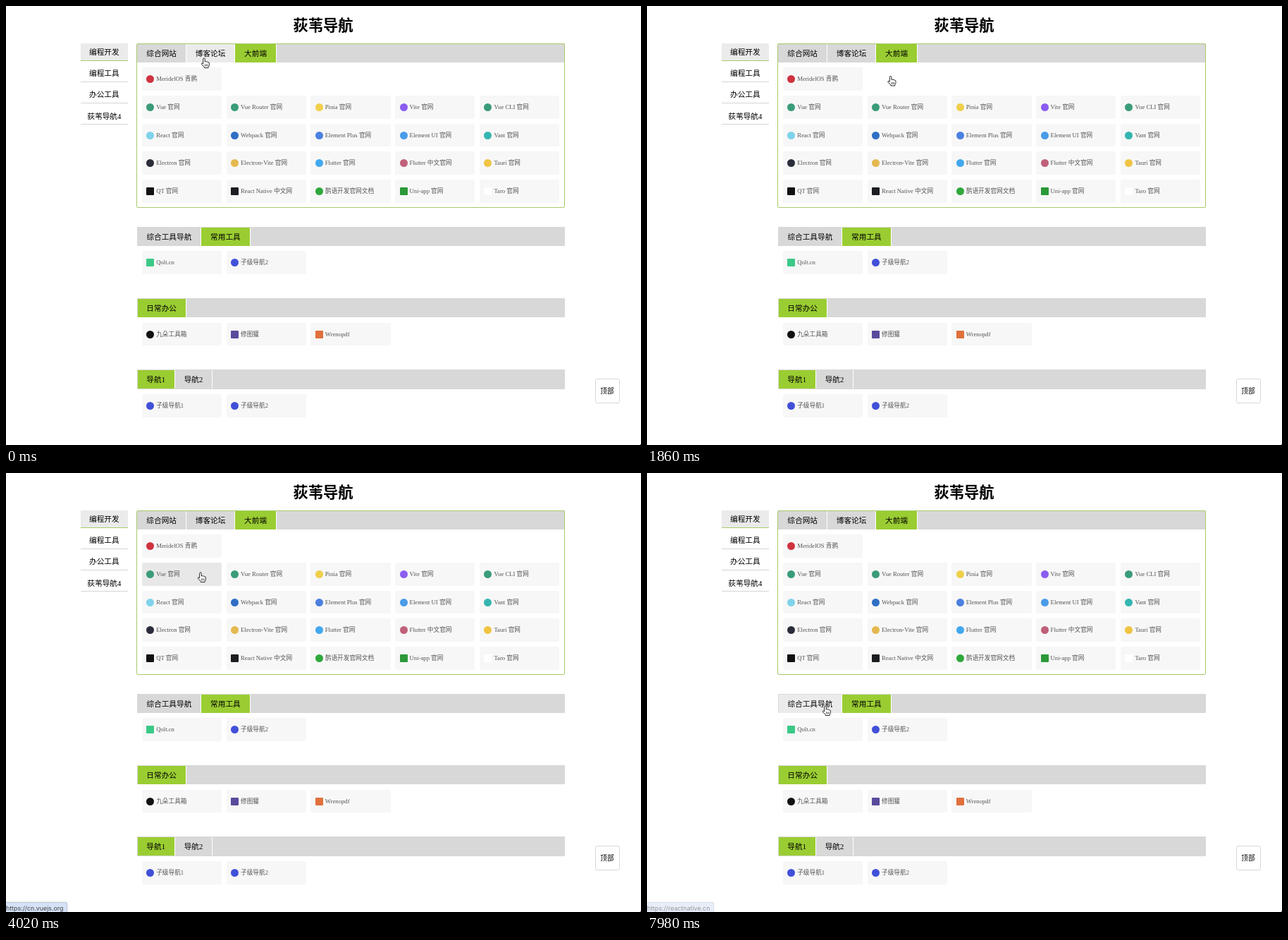
An HTML page that plays this animation: 901x622 px, repeating every 8000 ms.

```html
<!DOCTYPE html>
<html lang="zh-CN">
<head>
<meta charset="utf-8">
<title>荻苇导航</title>
<style>
html, body { margin: 0; width: 100%; height: 100%; overflow: hidden; background: #fff; }
#stage { position: relative; width: 901px; height: 622px; overflow: hidden; color: #000;
  font: 500 10.67px "Liberation Serif", "Noto Sans CJK SC", "Noto Sans CJK", serif; }
#stage div, #stage svg { position: absolute; white-space: pre; box-sizing: border-box; }
.mid { text-align: center; }
.bar { background: #d8d8d8; }
.tab { border-right: 1px solid #fff; text-align: center; }
.tab.hover { background: #ebebeb; }
.tab.on { background: #9acd32; }
.tile { background: #f7f7f7; border-radius: 2px; color: #555; font-weight: normal; font-size: 8.67px; padding-left: 20.5px; }
.tile.hover { background: #e8e8e8; }
.icon { width: 11px; height: 11px; left: 6.5px; top: 11px; }
.panel { border: 1px solid #a9c96a; border-radius: 2px; }
#tip, #status { font-family: Inter, "Noto Sans CJK SC", "Noto Sans CJK", sans-serif; font-weight: normal; }
#tip { height: 37px; padding: 0 5px; background: #d4d4d4; color: #222; font-size: 8.3px; line-height: 20.5px;
  border-radius: 1px; box-shadow: 0 1px 5px rgba(0,0,0,.3); }
#tip span { position: relative; top: -2.3px; }
#status { left: 0; top: 608px; height: 15px; padding-right: 5px; background: #d5e2f7; color: #444; font-size: 8.85px;
  line-height: 15px; border: solid #bcc8da; border-width: 1px 1px 0 0; border-radius: 0 3px 0 0;
  box-shadow: 0 0 4px rgba(0,0,0,.12); }
</style>
</head>
<body>
<div id="stage"></div>
<script>
const LOOP = 8000, TICK = 60, ROW = 39.67, COL = 119.8, SECTION = 101.3;
const stage = document.getElementById('stage');
const hits = [];

function box(parent, cls, x, y, w, h, text = '') {
  const el = document.createElement('div');
  el.className = cls;
  el.textContent = text;
  el.style.cssText = `left:${x}px;top:${y}px;width:${w}px;height:${h}px;line-height:${h}px`;
  return parent.appendChild(el);
}

function layer(view) {
  const el = box(stage, '', 0, 0, 901, 0);
  el.dataset.view = view;
  return el;
}

function tile(parent, view, x, y, [label, color, round, url]) {
  const el = box(parent, 'tile', x, y, 113.3, 32.7, label);
  const icon = document.createElement('div');
  icon.className = 'icon';
  icon.style.background = color;
  icon.style.borderRadius = round ? '50%' : '1px';
  el.append(icon);
  hits.push({ el, view, x, y, w: 113.3, h: 32.7, url });
}

// Tabs sit inside the thin grey edge of their bar.
function tabs(parent, view, y, labels, selected) {
  box(parent, 'bar', 186, y, 606.5, 27.3);
  let x = 186.5;
  labels.forEach((label, i) => {
    const w = label.replace(/\d/g, '').length * 10.67 + (/\d/.test(label) ? 5.3 : 0) + 26.7;
    const el = box(parent, 'tab' + (i === selected ? ' on' : ''), x, y + 0.8, w, 26, label);
    hits.push({ el, view, x, y, w, h: 27.3 });
    x += w;
  });
}

// label, icon colour, round icon, link
const frontend = [
  [['MeridelOS 青鹮', '#cf3340', 1]],
  [['Vue 官网', '#3a9c78', 1, 'https://cn.vuejs.org'], ['Vue Router 官网', '#3a9c78', 1, 'https://router.vuejs.org'],
   ['Pinia 官网', '#f0cf4a', 1, 'https://pinia.vuejs.org'], ['Vite 官网', '#8a5cf0', 1], ['Vue CLI 官网', '#3a9c78', 1]],
  [['React 官网', '#7fd3ea', 1, 'https://react.dev'], ['Webpack 官网', '#2f6fc4', 1, 'https://webpack.js.org'],
   ['Element Plus 官网', '#4b80e0', 1, 'https://element-plus.org/zh-CN/'], ['Element UI 官网', '#4a9be8', 1], ['Vant 官网', '#35b5b0', 1]],
  [['Electron 官网', '#2b2e3a', 1, 'https://www.electronjs.org'], ['Electron-Vite 官网', '#e5b94f', 1, 'https://electron-vite.org'],
   ['Flutter 官网', '#42a8ee', 1], ['Flutter 中文官网', '#c0607a', 1], ['Tauri 官网', '#f0c443', 1]],
  [['QT 官网', '#111', 0, 'https://www.qt.io'], ['React Native 中文网', '#1b1d20', 0, 'https://reactnative.cn'],
   ['鹊语开发官网文档', '#2fa83c', 1], ['Uni-app 官网', '#2b9939', 0], ['Taro 官网', '#fff', 0]]
];
const sites = [[['QVL 官网', '#111', 0], ['L5Lesson', '#c43a45', 0], ['稚雀教程', '#7fae55', 1],
  ['闾霁棠官网', '#111', 1], ['阿糯导航', '#e2664f', 1]]];
const sections = [
  [['综合工具导航', '常用工具'], 1, [['Qolt.cn', '#3cc988', 0, 'https://www.qolt.cn'], ['子级导航2', '#4150d8', 1]]],
  [['日常办公'], 0, [['九朵工具箱', '#111', 1], ['修图獾', '#5a4a9c', 0], ['Wrenopdf', '#e0703c', 0]]],
  [['导航1', '导航2'], 0, [['子级导航1', '#4150d8', 1], ['子级导航2', '#4150d8', 1]]]
];

const title = box(stage, 'mid', 350, 12, 200, 32, '荻苇导航');
title.style.fontSize = '21.33px';
title.style.fontWeight = 'bold';

['编程开发', '编程工具', '办公工具', '荻苇导航4'].forEach((label, i) => {
  const item = box(stage, 'mid', 106, 53 + i * 30.2, 66.7, 24.5, label);
  item.style.borderBottom = `1px solid ${i ? '#d5d5d5' : '#a9c96a'}`;
  if (!i) item.style.background = '#ebebeb';
});

const views = ['frontend', 'sites'].map((view, v) => {
  const el = layer(view), rows = v ? sites : frontend;
  tabs(el, view, 53, ['综合网站', '博客论坛', '大前端'], v ? 0 : 2);
  rows.forEach((row, r) => row.forEach((item, c) => tile(el, view, 192.7 + c * COL, 87.3 + r * ROW, item)));
  box(el, 'panel', 185, 53, 608, 74 + (rows.length - 1) * ROW);
  return el;
});

const lower = layer('lower');
sections.forEach(([labels, selected, items], s) => {
  const y = 312.7 + s * SECTION;
  tabs(lower, 'lower', y, labels, selected);
  items.forEach((item, c) => tile(lower, 'lower', 192.7 + c * COL, y + 34.6, item));
});

const toTop = box(stage, 'mid', 835.5, 528, 35, 35, '顶部');
toTop.style.cssText += ';border:1px solid #d8d8d8;border-radius:3px;line-height:33px;font-size:9.7px';
box(stage, '', 899.5, 620.5, 2, 2).style.background = '#222';

function popup(id) {
  const el = document.createElement('div');
  el.id = id;
  return stage.appendChild(el);
}
const status = popup('status');
const tip = popup('tip');
const tipText = tip.appendChild(document.createElement('span'));

stage.insertAdjacentHTML('beforeend', `<svg id="hand" width="16" height="18" viewBox="-5 -1 16 18" style="left:-5px;top:-1px">
  <path d="M-1.3 8V1.3a1.3 1.3 0 0 1 2.6 0V5q1-.9 2.2.2q1.2-.6 2 .5q1.9-.3 1.9 1.5V9.5q0 1.5-1.3 3V13.6H.3V12.4L-3.6 8.5q-.6-1.5.9-1.6z"
    fill="#fff" stroke="#111" stroke-width=".9" stroke-linejoin="round"/>
  <path d="M1.4 8.500v3M3.2 8.500v3M5 8.500v3" stroke="#111" stroke-width=".7"/></svg>`);
const hand = document.getElementById('hand');

// time, x, y of the pointer tip
const path = [[0, 281, 74], [420, 226, 68], [840, 226, 68], [1260, 352, 62], [1620, 352, 62], [2700, 301, 358],
  [2880, 301, 358], [3600, 276, 141], [5940, 276, 141], [6420, 486, 178], [7560, 486, 178], [7920, 253, 330], [LOOP, 253, 330]];
const tips = [
  [4620, 5940, 'https://cn.vuejs.org/\nVue 中文官方网站'],
  [6780, 7560, 'https://element-plus.org/zh-CN/\nElement Plus 是一个 Vue 3 UI 框架']
];

const viewAt = t => t >= 600 && t < 1500 ? 'sites' : 'frontend';
const shiftAt = t => viewAt(t) === 'sites' ? -4 * ROW : 0;

function pointerAt(t) {
  const i = Math.max(1, path.findIndex(p => p[0] >= t));
  const [t0, x0, y0] = path[i - 1], [t1, x1, y1] = path[i];
  const k = (t - t0) / (t1 - t0), e = k * k * (3 - 2 * k);
  return [x0 + (x1 - x0) * e, y0 + (y1 - y0) * e];
}

function hoverAt(t) {
  const [x, y] = pointerAt(t);
  return hits.find(h => {
    const top = h.y + (h.view === 'lower' ? shiftAt(t) : 0);
    return (h.view === 'lower' || h.view === viewAt(t)) &&
      x >= h.x && x < h.x + h.w && y >= top && y < top + h.h;
  });
}

// The last link lingers and fades after the pointer leaves it.
function showStatus(t) {
  status.style.opacity = 0;
  for (let age = 0; age < 540 && age <= t; age += TICK) {
    const hit = hoverAt(t - age);
    if (!hit || !hit.url) continue;
    status.textContent = hit.url;
    status.style.opacity = 1 - age / 540;
    return;
  }
}

function render(now) {
  const t = Math.floor((now % LOOP) / TICK) * TICK;
  const [x, y] = pointerAt(t), hovered = hoverAt(t);
  views.forEach(el => el.style.display = el.dataset.view === viewAt(t) ? '' : 'none');
  lower.style.transform = `translateY(${shiftAt(t)}px)`;
  hits.forEach(h => h.el.classList.toggle('hover', h === hovered));
  hand.style.transform = `translate(${x}px,${y}px)`;
  showStatus(t);
  const active = tips.find(([from, to]) => t >= from && t < to);
  tip.style.display = active ? '' : 'none';
  if (active) {
    tipText.textContent = active[2];
    tip.style.left = x - 1.5 + 'px';
    tip.style.top = y + 14 + 'px';
  }
}

const start = performance.now();
function frame() {
  render(performance.now() - start);
  requestAnimationFrame(frame);
}
frame();
</script>
</body>
</html>
```
